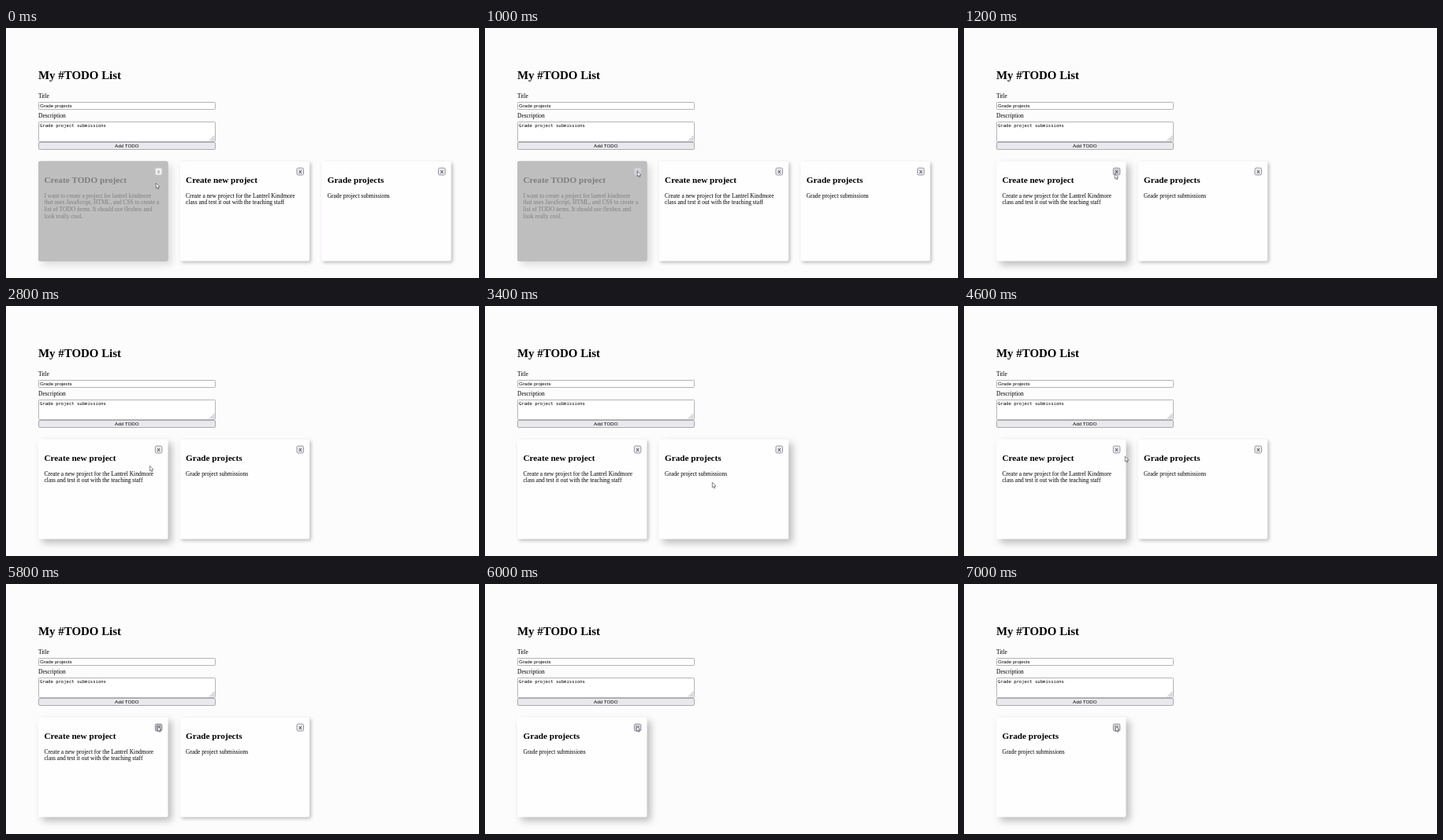
These frames come from a looping animation (600 px wide and 318 px high, 8 s). An HTML page with a canvas:

```html
<!DOCTYPE html>
<html lang="en">
<head>
<meta charset="utf-8">
<title>TODO list</title>
<style>
  html, body { margin: 0; width: 100%; height: 100%; overflow: hidden; background: #fdfcfd; }
  canvas { display: block; }
</style>
</head>
<body>
<canvas id="stage" width="600" height="318"></canvas>
<script>
const ctx = document.getElementById('stage').getContext('2d');
const LOOP = 8000;
const PAGE = '#fdfcfd';
const SERIF = '"Liberation Serif", "Times New Roman", serif';
const SANS = '"Liberation Sans", Arial, sans-serif';
const MONO = '"DejaVu Sans Mono", monospace';
const CARD = { x: 41, y: 169.5, w: 164.5, h: 127, step: 179.6 };
const BUTTON = { idle: '#e9e9ed', hover: '#d0d0d7', active: '#b1b1b9' };

const todos = [
  {
    title: 'Create TODO project',
    lines: ['I want to create a project for lantrel kindmore',
            'that uses JavaScript, HTML, and CSS to create a',
            'list of TODO items. It should use flexbox and',
            'look really cool.'],
    done: true
  },
  {
    title: 'Create new project',
    lines: ['Create a new project for the Lantrel Kindmore',
            'class and test it out with the teaching staff']
  },
  { title: 'Grade projects', lines: ['Grade project submissions'] }
];

// Each step: start time, then value(s) held until the next step.
const pointer = [
  [0, 190, 197], [200, 199, 183], [400, 193, 182], [1200, 191, 185],
  [1400, 179.5, 195], [2800, 182, 203], [3200, 247.5, 219.5], [3400, 288, 224],
  [4400, 238.5, 209.5], [4600, 204, 191], [4800, 199, 188], [5000, 182, 181],
  [5200, 192, 180.5]
];
const removed = [[0, 0], [1200, 1], [6000, 2]];
const hovered = [[0, 0], [3200, 1], [4600, 0]];
const closeState = [
  [0, 'idle'], [400, 'hover'], [1000, 'active'], [1200, 'hover'], [1400, 'idle'],
  [5200, 'hover'], [5800, 'active'], [6000, 'hover']
];

function at(steps, t) {
  let value = steps[0];
  for (const step of steps) if (step[0] <= t) value = step;
  return value.slice(1);
}

function text(str, x, y, font, color = '#000', align = 'left') {
  ctx.font = font;
  ctx.fillStyle = color;
  ctx.textAlign = align;
  ctx.fillText(str, x, y);
}

function box(x, y, w, h, r, fill, stroke) {
  ctx.beginPath();
  ctx.roundRect(x, y, w, h, r);
  ctx.fillStyle = fill;
  ctx.fill();
  if (stroke) {
    ctx.strokeStyle = stroke;
    ctx.lineWidth = 0.9;
    ctx.stroke();
  }
}

function drawForm() {
  text('My #TODO List', 41, 65, `bold 14.93px ${SERIF}`);
  text('Title', 41, 89, `7.46px ${SERIF}`);
  box(41.5, 94.5, 224, 9, 0.8, '#fff', '#acacb2');
  text('Grade projects', 43, 101.2, `6.2px ${SANS}`);
  text('Description', 41, 114, `7.46px ${SERIF}`);
  box(41.5, 119.5, 224, 25, 0.8, '#fff', '#acacb2');
  text('Grade project submissions', 43, 126.4, `5.58px ${MONO}`);

  ctx.strokeStyle = '#85858a';
  ctx.lineWidth = 0.7;
  ctx.beginPath();
  for (const d of [6.5, 4, 1.8]) {
    ctx.moveTo(264.5 - d, 143.5);
    ctx.lineTo(264.5, 143.5 - d);
  }
  ctx.stroke();

  box(41.5, 145.5, 224, 9, 1.5, '#e9e9ed', '#a3a3aa');
  text('Add TODO', 153.3, 152.4, `6.2px ${SANS}`, '#000', 'center');
}

function drawCard(todo, slot, hover, state) {
  const { y, w, h } = CARD;
  const x = CARD.x + slot * CARD.step;
  const alpha = 0.26 * (todo.done ? 0.5 : 1);

  ctx.save();
  ctx.shadowColor = `rgba(0, 0, 0, ${alpha})`;
  ctx.shadowOffsetX = ctx.shadowOffsetY = hover ? 4.7 : 1.9;
  ctx.shadowBlur = hover ? 9.3 : 4.2;
  box(x, y, w, h, 2, todo.done ? '#808080' : '#fefefe');
  ctx.restore();

  text(todo.title, x + 7.5, 197, `bold 11.2px ${SERIF}`);
  todo.lines.forEach((line, i) =>
    text(line, x + 7.5, 215.7 + i * 8.6, `7.46px ${SERIF}`));

  box(x + 148.3, 178, 8.6, 9, 1.7, BUTTON[state], '#8f8f9d');
  text('X', x + 152.6, 184.8, `6.2px ${SANS}`, '#000', 'center');

  // Half-opaque look of a finished item.
  if (todo.done) {
    ctx.globalAlpha = 0.5;
    box(x, y, w, h, 2, PAGE);
    ctx.globalAlpha = 1;
  }
}

function drawPointer(x, y) {
  ctx.save();
  ctx.translate(x + 0.3, y + 0.3);
  ctx.beginPath();
  ctx.moveTo(0, 0);
  ctx.lineTo(0, 6.6);
  ctx.lineTo(1.5, 5.3);
  ctx.lineTo(2.5, 7.6);
  ctx.lineTo(3.5, 7.1);
  ctx.lineTo(2.6, 4.9);
  ctx.lineTo(4.6, 4.8);
  ctx.closePath();
  ctx.fillStyle = '#fff';
  ctx.fill();
  ctx.strokeStyle = '#3c3c40';
  ctx.lineWidth = 0.6;
  ctx.stroke();
  ctx.restore();
}

function draw(t) {
  const [gone] = at(removed, t);
  const [target] = at(hovered, t);
  const [state] = at(closeState, t);

  ctx.fillStyle = PAGE;
  ctx.fillRect(0, 0, 600, 318);
  drawForm();
  todos.slice(gone).forEach((todo, slot) =>
    drawCard(todo, slot, slot === target, slot === 0 ? state : 'idle'));
  drawPointer(...at(pointer, t));
}

const start = performance.now();
function tick() {
  draw((performance.now() - start) % LOOP);
  requestAnimationFrame(tick);
}
tick();
</script>
</body>
</html>
```
